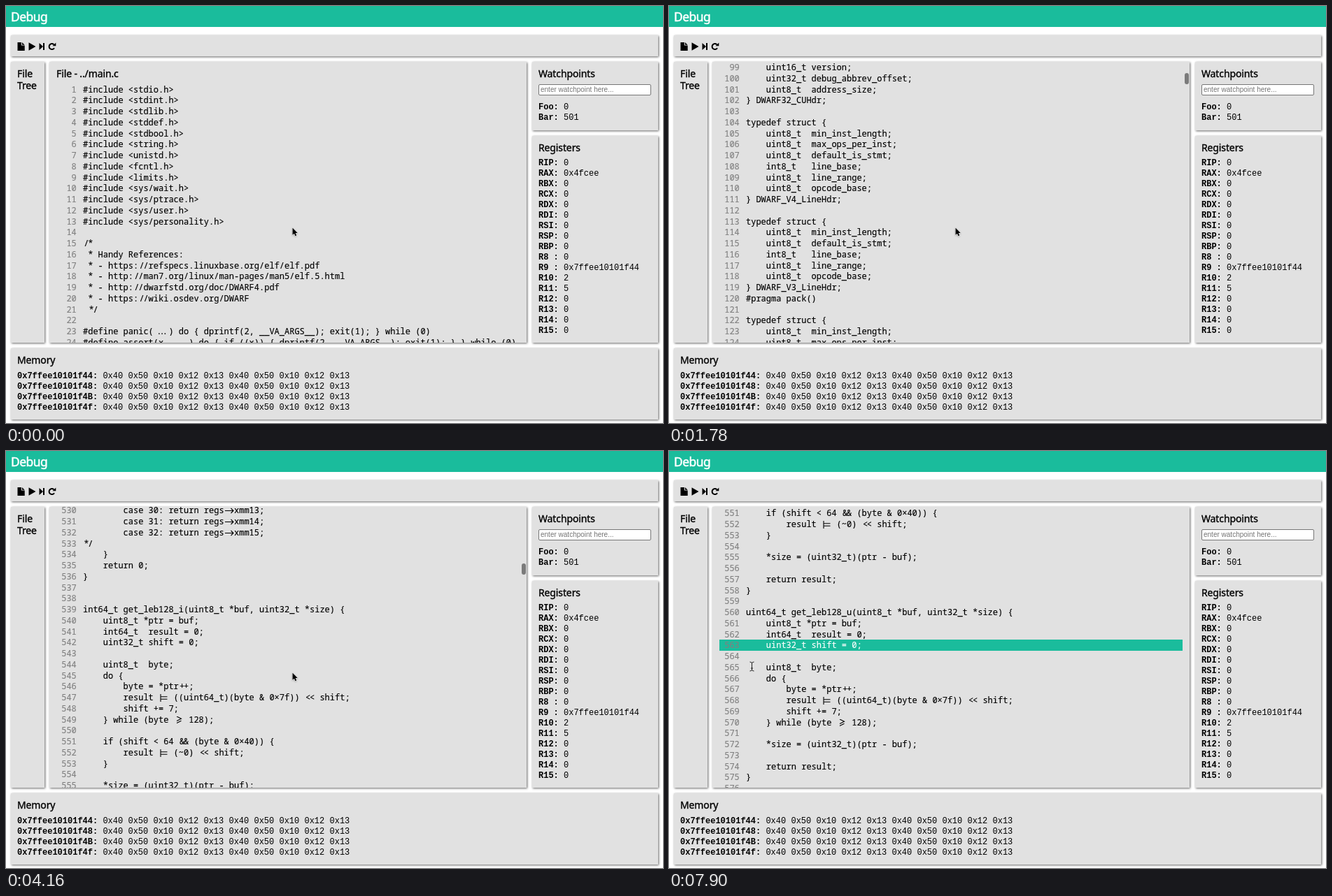
Animation, 939 px wide and 597 px high, one loop 8 s. Source, as an HTML page:

```html
<!DOCTYPE html>
<html lang="en">
<head>
<meta charset="utf-8">
<title>Debug</title>
<style>
html, body { margin: 0; width: 100%; height: 100%; overflow: hidden; background: #fff; color: #000; }
#stage { position: absolute; left: 0; top: 0; width: 939px; height: 597px; overflow: hidden; }
#stage svg.over, .panel, .panel > *, .panel h2 { position: absolute; }
header {
  height: 30px; padding-left: 7px; background: #1abc9c; color: #fff;
  font: 17.4px/30px "Noto Sans", sans-serif; letter-spacing: -.5px; -webkit-text-stroke: .5px;
}
.panel { background: #e1e1e1; box-shadow: 1px 1px 3px #666; }
h2 {
  left: 9px; top: 8px; margin: 0; white-space: pre;
  font: 14px/17px "Noto Sans", sans-serif; letter-spacing: -.12px; -webkit-text-stroke: .35px;
}
pre { left: 9px; top: 32px; margin: 0; font: 12px/15px "Liberation Mono", monospace; }
.field {
  left: 9px; top: 32px; width: 157px; height: 14px; padding-left: 2px;
  border: 1px solid #767676; border-radius: 2px; background: #fff; color: #757575;
  font: 10px/14px "Liberation Sans", sans-serif;
}
#code { overflow: hidden; }
#page { left: 0; top: 0; width: 682px; }
#page h2 { left: 10px; }
#lines {
  position: absolute; left: 10px; top: 31.6px; width: 662px;
  font: 12px/15.75px "Noto Sans Mono", "DejaVu Sans Mono", monospace; -webkit-text-stroke: .15px;
}
#lines div { height: 15.75px; white-space: pre; }
#lines u { margin-right: 9.2px; color: #808080; text-decoration: none; }
#lines .hit { background: #1abc9c; color: #fff; }
#lines i { display: inline-block; font-style: normal; text-align: center; letter-spacing: -1.3px; }
#lines i.dots { letter-spacing: -3px; }
#lines svg { width: 14.4px; height: 11px; vertical-align: -2px; fill: none; stroke: currentColor; stroke-width: 1.1; }
#thumb { left: 675px; top: 0; width: 6px; height: 16px; border-radius: 3px; background: #7b7b7b; }
</style>
</head>
<body>
<div id="stage">
  <header>Debug</header>
  <div class="panel" style="left:7px;top:42px;width:925px;height:30px"></div>
  <div class="panel" style="left:7px;top:80px;width:48px;height:402px"><h2>File
Tree</h2></div>
  <div class="panel" id="code" style="left:62px;top:80px;width:682px;height:402px">
    <div id="page"><h2>File - ../main.c</h2><div id="lines"></div></div>
    <div id="thumb"></div>
  </div>
  <div class="panel" style="left:752px;top:80px;width:180px;height:98px">
    <h2>Watchpoints</h2>
    <div class="field">enter watchpoint here...</div>
    <pre id="watch" style="top:58px"></pre>
  </div>
  <div class="panel" style="left:752px;top:186px;width:180px;height:296px">
    <h2>Registers</h2><pre id="regs"></pre>
  </div>
  <div class="panel" style="left:7px;top:490px;width:925px;height:102px">
    <h2>Memory</h2><pre id="memory" style="top:33px"></pre>
  </div>
  <svg class="over" style="left:0;top:0" width="939" height="597">
    <path d="M16.5 52h5.5v4.5h4.7v7.5h-10.2zM23 52l3.7 3.7h-3.7z"/>
    <path d="M32.5 52.3L42.5 58L32.5 63.7ZM47.5 53L53 58L47.5 63ZM53 53h2v10h-2z"/>
    <path d="M69 60.2A4 4 0 1 1 68.4 55.2" fill="none" stroke="#000" stroke-width="2"/>
    <path d="M71.3 52.5V57.2H66.6Z"/>
    <g id="arrow" style="filter:drop-shadow(0 1px 1px #0004)">
      <path d="M0 0V10.3L2.4 8.2L4 11.7L5.7 11L4.2 7.5H7.3Z" stroke="#fff" paint-order="stroke"/>
    </g>
    <path id="beam" d="M-3 -6.5Q0 -6.5 0 -4.5Q0 -6.5 3 -6.5M0 -4.5V4.5M-3 6.5Q0 6.5 0 4.5Q0 6.5 3 6.5M-1.5 2.5H1.5" fill="none" stroke="#222"/>
  </svg>
</div>
<script>
const $ = id => document.getElementById(id);

// Side panels
const rows = list => list.map(([k, v]) => `<b>${k}:</b> ${v}`).join('\n');
$('watch').innerHTML = rows([['Foo', 0], ['Bar', 501]]);
const set = { RAX: '0x4fcee', 'R9 ': '0x7ffee10101f44', R10: 2, R11: 5 };
const names = 'RIP,RAX,RBX,RCX,RDX,RDI,RSI,RSP,RBP,R8 ,R9 ,R10,R11,R12,R13,R14,R15'.split(',');
$('regs').innerHTML = rows(names.map(n => [n, set[n] || 0]));
const bytes = '0x40 0x50 0x10 0x12 0x13 '.repeat(2);
$('memory').innerHTML = rows(['44', '48', '4B', '4f'].map(a => ['0x7ffee10101f' + a, bytes]));

// Source listing
const lines = [];
const put = text => lines.push(...text.split('\n'));
let seed = 7;
const pick = list => list[(seed = seed * 16807 % 2147483647) % list.length];
const words = 'addr,size,offset,line,file,name,type,flags,index,count,entry,scope,block,value'.split(',');
const types = ['uint64_t', 'uint32_t', 'uint16_t', 'uint8_t', 'int', 'char'];
const field = (type, name) => `    ${type.padEnd(8)} ${name};`;
const cap = w => w[0].toUpperCase() + w.slice(1);
const some = make => Array.from({ length: pick([4, 5, 6, 7, 8]) }, make);

const randomStruct = () => ['typedef struct {',
  ...some(() => field(pick(types), pick(words) + '_' + pick(words))),
  `} DW${cap(pick(words))}${cap(pick(words))};`, ''];
const randomFunction = () => [`${pick(types)} get_${pick(words)}_${pick(words)}(uint8_t *buf, uint32_t *size) {`,
  '    uint32_t result = 0;', '',
  ...some(() => `    result += read_${pick(words)}(buf, ${pick(words)});`),
  '', '    return result;', '}', ''];

// Generates blocks up to the given line, then pads with blanks
function fill(last, make) {
  for (let b = make(); lines.length + b.length <= last; b = make()) lines.push(...b);
  while (lines.length < last) lines.push('');
}

const lineHdr = (end, maxOps) => put(['typedef struct {', field('uint8_t', 'min_inst_length'),
  ...(maxOps ? [field('uint8_t', 'max_ops_per_inst')] : []),
  field('uint8_t', 'default_is_stmt'), field('int8_t', 'line_base'),
  field('uint8_t', 'line_range'), field('uint8_t', 'opcode_base'), end].join('\n'));

const leb = (sig, extra) => put(`${sig}(uint8_t *buf, uint32_t *size) {
    uint8_t *ptr = buf;
    int64_t  result = 0;
    uint32_t shift = 0;

    uint8_t  byte;
    do {
        byte = *ptr++;
        result |= ((uint64_t)(byte & 0x7f)) << shift;
        shift += 7;
    } while (byte >= 128);
${extra}
    *size = (uint32_t)(ptr - buf);

    return result;
}
`);

'stdio stdint stdlib stddef stdbool string unistd fcntl limits sys/wait sys/ptrace sys/user sys/personality'
  .split(' ').forEach(h => put(`#include <${h}.h>`));
put(`
/*
 * Handy References:
 * - https://refspecs.linuxbase.org/elf/elf.pdf
 * - http://man7.org/linux/man-pages/man5/elf.5.html
 * - http://dwarfstd.org/doc/DWARF4.pdf
 * - https://wiki.osdev.org/DWARF
 */

#define panic(...) do { dprintf(2, __VA_ARGS__); exit(1); } while (0)
#define assert(x, ...) do { if ((x)) { dprintf(2, __VA_ARGS__); exit(1); } } while (0)
#define happy_death(...) do { dprintf(2, __VA_ARGS__); exit(0); } while (0)

// GLOBALS
#define HW_SLOTS_MAX 4
#define BLOCK_STACK_MAX 20
#define LINE_TABLES_MAX 20
#define TYPE_CHAIN_MAX 20
#define MEMBERS_MAX 30
#define VAL_STACK_MAX 32
#define BREAKPOINTS_MAX 1024
#define WATCHPOINTS_MAX 1024
#define LINE_BUFFER_MAX 1024
#define BLOCK_MAX 1024
#define ABBREV_MAX 1024
#define FILE_MAX 1024
#define FUNC_MAX 4096

#pragma pack(1)`);
fill(96, randomStruct);
put(`typedef struct {
    uint32_t unit_length;
    uint16_t version;
    uint32_t debug_abbrev_offset;
    uint8_t  address_size;
} DWARF32_CUHdr;
`);
lineHdr('} DWARF_V4_LineHdr;\n', true);
lineHdr('} DWARF_V3_LineHdr;\n#pragma pack()\n', false);
lineHdr('} LineHdr;\n', true);
fill(239, randomStruct);
put(`typedef struct {
    uint64_t addr;
    uint64_t idx;
    HWBreakType type;
} HWBreak;


typedef enum {
    DWString,
    DWIVal,
    DWUVal,
    DWOffset,
    DWAddr,
    DWExpr
} DWType;

typedef struct {
    DWType type;
    union {
        uint64_t val;
        uint8_t *expr;
        char *str;
    } data;
    int size;
    int skip;
} DWResult;

typedef struct {
    DWResult *results;
    int count;
} DWResultList;
`);
fill(350, randomStruct);
fill(496, randomFunction);
put('uint64_t get_reg(struct user_regs_struct *regs, int reg) {\n    switch (reg) {');
const slots = 'rax rdx rcx rbx rsi rdi rbp rsp r8 r9 r10 r11 r12 r13 r14 r15 rip'.split(' ');
for (let n = 0; n < 33; n++) {
  if (n === 17) put('/*');
  put(`        case ${n}: return regs->${slots[n] || 'xmm' + (n - 17)};`);
}
put('*/\n    }\n    return 0;\n}\n\n');
leb('int64_t get_leb128_i', `
    if (shift < 64 && (byte & 0x40)) {
        result |= (~0) << shift;
    }
`);
leb('uint64_t get_leb128_u', '');
put('');

// Joined operators, as a coding font sets them
const drawn = {
  '->': 'M1 5.5H13M9.5 2L13 5.5L9.5 9',
  '>=': 'M4 0L10.5 3.3L4 6.6M4 9.6L10.5 6.3',
  '|=': 'M3 0V11M3 3.8H12.5M3 7.2H12.5'
};
const escape = s => s.replace(/&/g, '&amp;').replace(/</g, '&lt;');
const join = s => drawn[s]
  ? `<svg viewBox="0 0 14.4 11"><path d="${drawn[s]}"/></svg>`
  : `<i${s === '...' ? ' class="dots"' : ''} style="width:${s.length}ch">${escape(s)}</i>`;
const setType = s => s.replace(/0x/g, '0×')
  .split(/(\.\.\.|&&|<<|\+\+|\*\/|\/\*|\/\/|->|>=|\|=)/)
  .map((part, i) => i % 2 ? join(part) : escape(part)).join('');
$('lines').innerHTML = lines.map((s, i) =>
  `<div><u>${String(i + 1).padStart(4)}</u>${setType(s)}</div>`).join('');
const hitLine = $('lines').children[562];

// Motion: keys are [step, value...], joined by monotone cubics
const STEP = 149, LEAD = 18, LOOP = 8000;
const scrollKeys = [[0, 0], [4, 230], [12, 1575], [19, 3828], [28, 8366], [31, 8692.8]];
const mouseKeys = [[0, 409.5, 317.5], [28, 409.5, 317.5], [31, 279, 270], [33, 230.5, 286], [36, 230.5, 286],
  [41, 99.5, 280.5], [43, 82.5, 280.5], [46, 82.5, 280.5], [50, 113, 326], [53, 118.5, 308.5]];

const slope = (K, i, c) => (K[i + 1][c] - K[i][c]) / (K[i + 1][0] - K[i][0]);
function tangent(K, i, c) {
  if (!i || i === K.length - 1) return 0;
  const a = slope(K, i - 1, c), b = slope(K, i, c);
  return a * b > 0 ? 2 * a * b / (a + b) : 0;
}
function at(K, k, c = 1) {
  const i = K.findLastIndex(p => p[0] <= k);
  if (i === K.length - 1) return K[i][c];
  const d = K[i + 1][0] - K[i][0], u = (k - K[i][0]) / d, v = 1 - u;
  return v * v * (1 + 2 * u) * K[i][c] + u * u * (3 - 2 * u) * K[i + 1][c]
    + d * u * v * (v * tangent(K, i, c) - u * tangent(K, i + 1, c));
}

let shown = -1;
function draw(now) {
  const k = Math.floor((now % LOOP + LEAD) / STEP);
  if (k !== shown) {
    shown = k;
    const y = at(scrollKeys, k);
    $('page').style.top = -y + 'px';
    $('thumb').style.top = 0.8 + y * .0096 + 'px';
    $('thumb').style.opacity = k < 1 || k > 37 ? 0 : k === 37 ? .5 : 1;
    hitLine.className = k >= 44 ? 'hit' : '';
    const mx = at(mouseKeys, k), my = at(mouseKeys, k, 2);
    const overText = mx > 108 && mx < 275;
    for (const id of ['arrow', 'beam']) {
      $(id).setAttribute('transform', `translate(${mx} ${my})`);
      $(id).setAttribute('visibility', (id === 'beam') === overText ? 'visible' : 'hidden');
    }
  }
  requestAnimationFrame(draw);
}
draw(performance.now());
</script>
</body>
</html>
```
